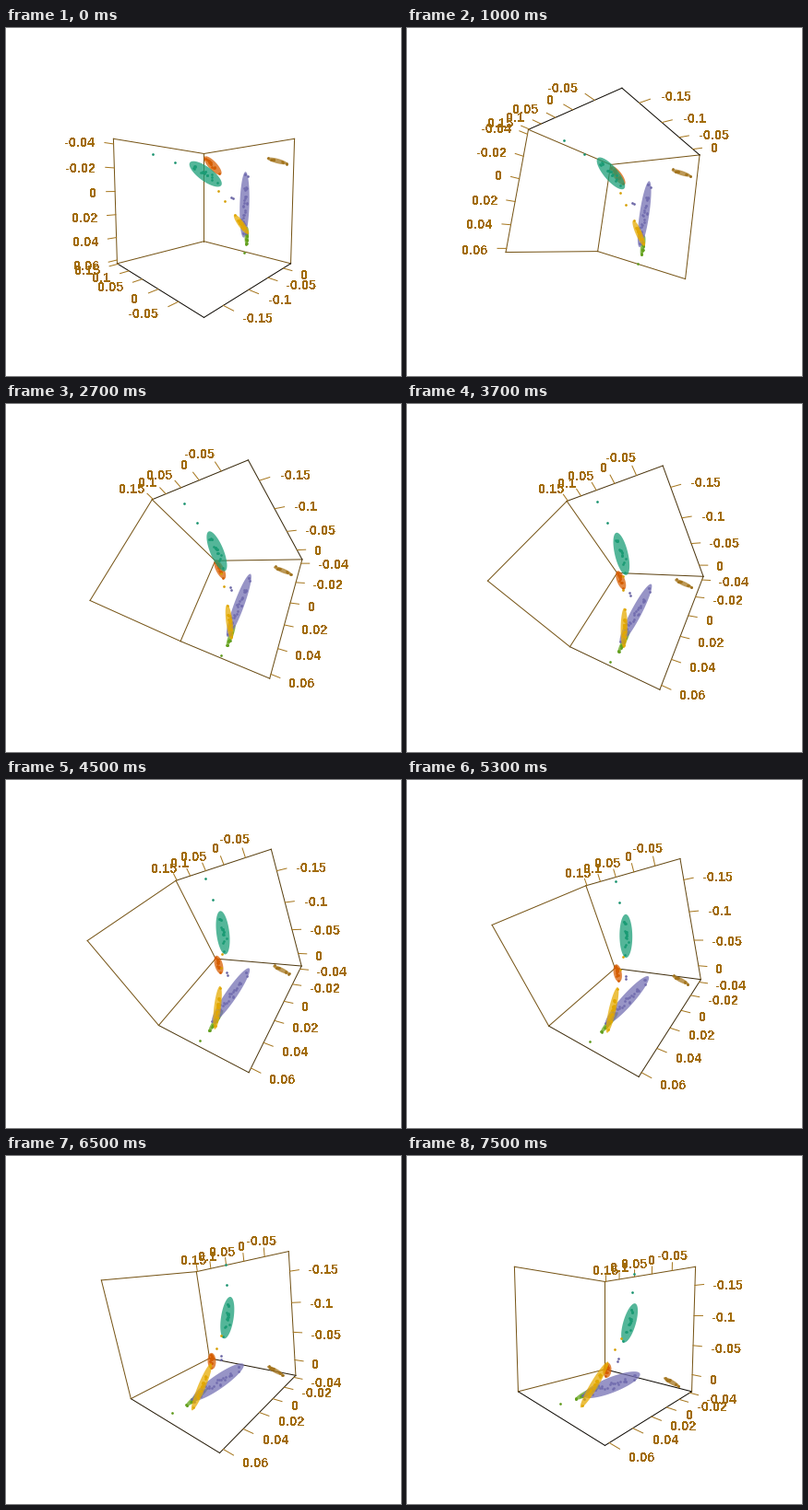
Recreate the animation shown at these times as a matplotlib script. Size 428 by 378 pixels, loop 7600 ms.

```python
from itertools import product

import numpy as np
import matplotlib.pyplot as plt
from matplotlib.animation import FuncAnimation
from matplotlib.colors import to_rgb

W, H, DPI = 428, 378, 100
PX = 72 / DPI                       # points per pixel
FRAMES, STEP = 76, np.radians(1.2)
FOCAL, DIST, TILT = 225.3, 3.318, np.radians(4)
TICK = 2 / 15
GOLD = np.array(to_rgb("#a6761d"))
INK = "#a26c08"

# Axis directions at rest: a points down, b to the back left, c to the back right
R2 = np.sqrt(0.5)
EA, EB, EC = np.array([[0, -1, 0], [-R2, 0, -R2], [R2, 0, -R2]])
ST, CT = np.sin(TILT), np.cos(TILT)
CAMERA = np.array([[1, 0, 0], [0, CT, -ST], [0, ST, CT]])

# Tick step and data range of axes a, b and c
RANGES = [(0.02, -0.0443, 0.0632), (0.05, -0.0994, 0.1538), (0.05, -0.180, 0.0293)]

rng = np.random.default_rng(5)


class Group:
    """A spindle-shaped cluster of dots, with a few strays along its tail."""

    def __init__(self, color, center, long, r, flat=1.0, tail=None, stops=()):
        self.rgb = np.array(to_rgb(color))
        self.center, long = np.array(center), np.array(long)
        size = np.linalg.norm(long)
        unit = long / size
        side = np.array([0, 0, 1]) - unit[2] * unit
        side /= np.linalg.norm(side)
        self.axes = np.array([long, r * side, r * flat * np.cross(unit, side)])
        n = int(40 * size + 6)
        spread = np.clip(rng.normal(0, [0.5, 0.2, 0.2], (n, 3)), -0.9, 0.9)
        strays = [self.center + s * np.array(tail) for s in stops]
        self.dots = np.vstack([self.center + spread @ self.axes, *strays])


# Listed from back to front
GROUPS = [
    Group("#d95f02", (-0.70, 0.635, 0.895), (0.19, -0.17, 0.07), 0.088),
    Group("#1b9e77", (-0.44, -0.147, -0.113), (0.15, 0, 0.325), 0.105,
          tail=(-0.2, 0.06, -0.86), stops=(0.62, 1)),
    Group("#66a61e", (0.62, -0.3, 0.775), (0.18, 0.04, 0.05), 0.036,
          tail=(0.35, 0.11, 0.075), stops=(1,)),
    Group("#7570b3", (0.07, -0.215, 0.82), (0.6, 0.03, 0.03), 0.125, 0.45,
          tail=(-0.15, 0, -0.39), stops=(0.87, 1)),
    Group("#e6ab02", (0.42, -0.21, 0.735), (0.215, 0.05, 0.29), 0.055,
          tail=(-0.6, 0.02, -0.61), stops=(0.74, 1)),
    Group("#a6761d", (-0.655, -0.82, 0.805), (0.055, -0.16, 0.02), 0.036),
]


def rotation(angle):
    """Rows are the eye-space directions of axes a, b and c."""
    s, c = np.sin(angle), np.cos(angle)
    return np.array([c * EA - s * EC, EB, c * EC + s * EA]) @ CAMERA.T


def project(eye):
    scale = FOCAL / (DIST - eye[..., 2])
    return np.stack([W / 2 + eye[..., 0] * scale,
                     H / 2 - eye[..., 1] * scale], -1)


def draw_box(rot, sign):
    """Outline the three back faces, each lit by how squarely it faces us."""
    for axis, (u, v) in product(range(3), product((-1, 1), repeat=2)):
        corner = np.insert([u, v], axis, 0)
        faces = [i for i in range(3) if corner[i] == sign[i]]
        if not faces:
            continue
        owner = min(faces, key=(1, 2, 0).index)
        along = np.eye(3)[axis]
        x, y = project(np.array([corner - along, corner + along]) @ rot).T
        ax.plot(x, y, color=abs(rot[owner, 2]) * GOLD, lw=PX, zorder=1)


def text_width(s):
    return sum({".": 4, "-": 5}.get(ch, 8) for ch in s)


def draw_axis(rot, axis, corner, out):
    """Ticks and labels on the edge through corner, pointing along -out."""
    step, lo, hi = RANGES[axis]
    tick = -TICK * np.eye(3)[out]
    for k in range(int(np.ceil(lo / step)), int(hi / step) + 1):
        base = np.array(corner, float)
        base[axis] = 2 * (k * step - lo) / (hi - lo) - 1
        p0, p1, p2 = project((base + np.outer(range(3), tick)) @ rot)
        ax.plot(*np.array([p0, p1]).T, color=GOLD, lw=PX, zorder=1)
        label = f"{k * step:g}"
        side = (p2 - p0)[0] / np.hypot(*(p2 - p0))
        ax.text(p2[0] + side * text_width(label) / 2, p2[1] + 6.3, label,
                ha="center", va="baseline", color=INK, family="Liberation Sans",
                weight="bold", size=14.4 * PX, antialiased=False, zorder=2)


def draw_group(rot, g, z):
    x, y = project(g.dots @ rot).T
    ax.plot(x, y, "o", ms=2.7 * PX, mew=0, color=g.rgb * 0.93, zorder=z)
    # Silhouette from the projection linearised at the centre
    eye = g.center @ rot
    depth = DIST - eye[2]
    jac = FOCAL / depth * np.array([[1, 0, eye[0] / depth],
                                    [0, -1, -eye[1] / depth]])
    q = jac @ (g.axes @ rot).T
    val, vec = np.linalg.eigh(q @ q.T)
    a = np.linspace(0, 2 * np.pi, 72)
    ring = project(eye)[:, None] + (vec * np.sqrt(val)) @ [np.cos(a), np.sin(a)]
    ax.fill(*ring, color=g.rgb, alpha=0.75, lw=0, zorder=z + 0.5)


def draw(frame):
    ax.clear()
    ax.set(xlim=(-0.5, W - 0.5), ylim=(H - 0.5, -0.5))
    ax.axis("off")
    rot = rotation(frame * STEP)
    sign = np.where(rot[:, 2] < 0, 1, -1)   # faces turned away from the viewer
    draw_box(rot, sign)
    if rot[2, 2] - rot[1, 2] > 0.003:
        draw_axis(rot, 0, (0, -1, 1), 1)
    else:
        draw_axis(rot, 0, (0, 1, -1), 2)
    draw_axis(rot, 1, (sign[0], 0, -1), 2)
    draw_axis(rot, 2, (sign[0], -1, 0), 1)
    for z, g in enumerate(GROUPS, 3):
        draw_group(rot, g, z)
    return []


fig = plt.figure(figsize=(W / DPI, H / DPI), dpi=DPI, facecolor="white")
ax = fig.add_axes([0, 0, 1, 1])
anim = FuncAnimation(fig, draw, frames=FRAMES, init_func=lambda: [],
                     interval=100, repeat=True, repeat_delay=0)
plt.show()
```
